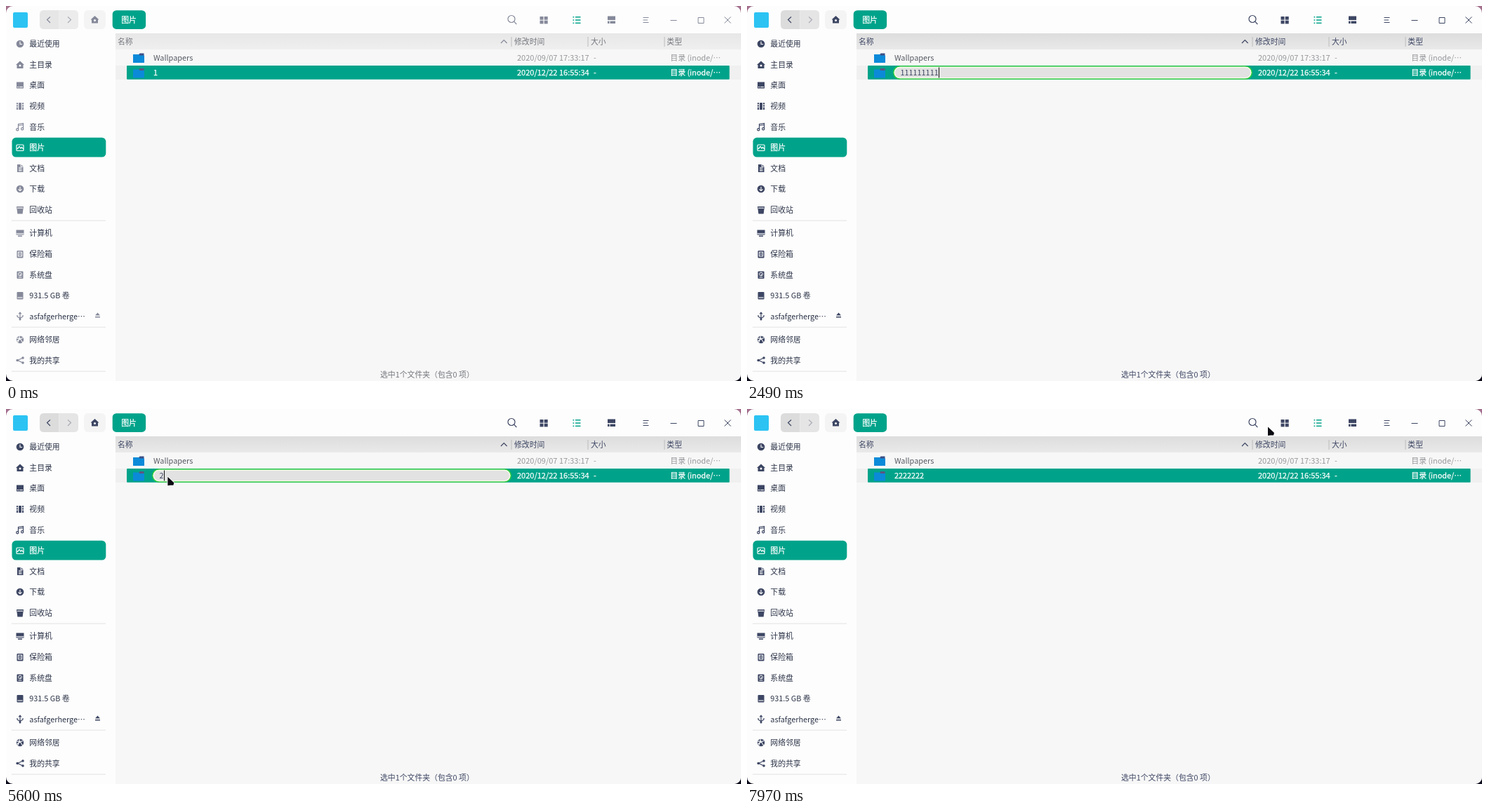
Write an HTML page that moves like this. It is 1047 px wide and 535 px high and loops after 8 s.

```html
<!DOCTYPE html>
<html lang="zh-CN">
<head>
<meta charset="utf-8">
<title>Rename a folder</title>
<style>
html, body { margin: 0; width: 100%; height: 100%; overflow: hidden; background: #16121f; }
svg {
  display: block; width: 1047px; height: 535px;
  --ink: #3d4663; --head: #3d4663; --bar1: #dddddd; --bar2: #e9e9e9; --back: #dcdcdc; --fwd: #e5e5e5;
}
svg.idle { --ink: #85899a; --head: #75777e; --bar1: #e7e7e7; --bar2: #efefef; --back: #e6e6e6; --fwd: #ececec; }
text { font: 10.85px "Noto Sans CJK SC", "Noto Sans CJK", "Noto Sans", sans-serif; white-space: pre; }
text.date { font-size: 11px; }
.bold { stroke: currentColor; stroke-width: .25px; }
.line { fill: none; stroke: var(--ink); stroke-width: 1.2; }
.ink { fill: var(--ink); }
.sheet { filter: drop-shadow(0 3px 7px rgba(0, 0, 0, .5)); }
</style>
</head>
<body>
<svg id="stage" viewBox="0 0 1047 535"></svg>
<script>
const TEAL = '#00a38a', LOOP = 8000;
const stage = document.getElementById('stage');

const rect = (x, y, w, h, fill, more = '') =>
  `<rect x="${x}" y="${y}" width="${w}" height="${h}" fill="${fill}" ${more}/>`;
// y is the middle of the line
const text = (x, y, s, fill, cls = '') =>
  `<text x="${x}" y="${y + 4}" fill="${fill}" color="${fill}" class="${cls}">${s}</text>`;
const strong = (x, y, s, fill, cls = '') => text(x, y, s, fill, 'bold ' + cls);
const at = (x, y, body) => `<g transform="translate(${x} ${y})">${body}</g>`;
const path = (d, cls = 'ink', more = '') => `<path class="${cls}" d="${d}" ${more}/>`;
const hole = (d) => `<path d="${d}" fill="none" stroke="#fdfdfd" stroke-width="1.1"/>`;

const drive = path('M-3.5-5h7q1 0 1 1V4.5q0 1-1 1h-7q-1 0-1-1V-4q0-1 1-1z');
const house = path('M0-5.5L6 0H4.5V5H-4.5V0H-6z') + '<circle cy="1" r="1.5" fill="#fdfdfd"/>';
const icons = {
  clock: '<circle r="5.3" class="ink"/>' + hole('M0-3.5V.5H3.2'),
  house,
  desk: path('M-5-4.5H5V4.5H-5z') + hole('M-4 2.5H-2M-1 2.5H4'),
  film: path('M-5-5H5V5H-5z') + hole('M-2.5-5V5M2.5-5V5M-5-2.2H-2.5M-5 1H-2.5M2.5-2.2H5M2.5 1H5'),
  note: path('M-2.5 3.5V-4L4.5-5V2.5M-2.5-2L4.5-3', 'line') +
    '<circle cx="-3.7" cy="3.7" r="1.6" class="line"/><circle cx="3.2" cy="2.7" r="1.6" class="line"/>',
  photo: '<path d="M-4-4H4q1 0 1 1V3.5q0 1-1 1H-4q-1 0-1-1V-3q0-1 1-1zM-4 2L-1-1.5 1 1 2.5-.5 4.5 2" fill="none" stroke="#fff" stroke-width="1.2"/>',
  doc: path('M-4-5.5H1.5L4.5-2.5V5.5H-4z') + hole('M-2-.8H2.5M-2 1.3H2.5M-2 3.4H2.5M1.2-5.5V-2.2H4.5'),
  down: '<circle r="5.3" class="ink"/>' + hole('M0-3.2V2.5M-2.5.3L0 2.8 2.5.3'),
  bin: path('M-5-5H5L3.6 5.5H-3.6z') + hole('M-4-2.8H4'),
  screen: path('M-5.5-4.5H5.5V2.5H-5.5zM-3 3.5H3V5H-3z') + hole('M-5.5 .8H5.5'),
  safe: drive + hole('M-2.5-3H2.5V3H-2.5zM0-1.5V1.5'),
  system: drive + '<circle cy="-1" r="2.4" fill="none" stroke="#fdfdfd"/>' + hole('M-2.5 3.5H2.5M0-1L1.5 1'),
  disk: drive + hole('M-3.5 3H3.5'),
  usb: path('M0 5V-5M-1.8-3.2L0-5.3 1.8-3.2M-4-1.5V.5L0 3.2 4 .5V-1.5', 'line') + '<circle cy="4.5" r="1.5" class="ink"/>',
  net: '<circle r="5.2" class="ink"/>' + hole('M-4.5-1.5Q0-4 3.5 4M-3 4Q-3-1 4-2.5M-1-5Q1-1-4.5 2'),
  share: path('M4-3.5L-3.5 0 4 3.5', 'line') + [[4, -3.5], [-3.8, 0], [4, 3.5]]
    .map(([x, y]) => `<circle cx="${x}" cy="${y}" r="1.8" class="ink"/>`).join('')
};

const places = [
  [54, 'clock', '最近使用'], [84, 'house', '主目录'], [113, 'desk', '桌面'], [143, 'film', '视频'],
  [172.5, 'note', '音乐'], [202, 'photo', '图片'], [231.5, 'doc', '文档'], [261, 'down', '下载'],
  [291, 'bin', '回收站'], [324, 'screen', '计算机'], [354, 'safe', '保险箱'], [383.5, 'system', '系统盘'],
  [413, 'disk', '931.5 GB 卷'], [442.5, 'usb', 'asfafgerherge…'], [476, 'net', '网络邻居'], [505.5, 'share', '我的共享']
];

function sidebar() {
  const seps = [306, 458, 521].map(y => rect(8, y - .5, 134, 1.5, '#ebebeb')).join('');
  const rows = places.map(([y, icon, name]) => {
    const on = icon === 'photo';
    return (on ? rect(8.5, 187.8, 133.8, 27.8, TEAL, 'rx="5.5"') : '') + at(20, y, icons[icon]) +
      (on ? strong : text)(33.3, y, name, on ? '#fff' : '#2c3448');
  }).join('');
  return seps + rows + path('M127 441.5L130.5 437.5 134 441.5zM127 443H134V444.5H127z');
}

function toolbar() {
  const tiles = [-5.5, .7].flatMap(x => [-5, .7].map(y => rect(x, y, 5, 4.7, 'var(--ink)'))).join('');
  const list = [-5, -.7, 3.6].map(y => rect(-5.5, y, 1.8, 1.5, TEAL) + rect(-2, y, 7.5, 1.5, TEAL)).join('');
  return rect(10, 9, 21, 22, '#2cc3f3', 'rx="2"') +
    path('M54 6H75.5V33H54q-6 0-6-6V12q0-6 6-6z', '', 'fill="var(--back)"') +
    path('M75.5 6H97q6 0 6 6V27q0 6-6 6H75.5z', '', 'fill="var(--fwd)"') +
    path('M63 15.5L58.5 19.5 63 24', 'line') +
    '<path d="M88 15.5L92.5 19.5 88 24" fill="none" stroke="#aaacb5" stroke-width="1.2"/>' +
    rect(111, 6, 31, 27, '#f4f4f4', 'rx="6"') + at(126.5, 19.5, house) +
    rect(151.7, 6.2, 47.4, 26.7, TEAL, 'rx="5.5"') + strong(164.2, 19.7, '图片', '#fff') +
    '<circle cx="720" cy="18.5" r="5" class="line"/>' + path('M723.6 22.2L727.3 26', 'line') +
    at(766, 20, tiles) + at(813, 20, list) +
    path('M857 14.5H868V20H857zM857 21.5H859.5V25H857zM860.5 21.5H868V25H860.5z') +
    path('M907.5 16.5H915.5M907.5 20H914M907.5 23.5H915.5M946.5 20.5H955.5M986 16.5H994V24.5H986zM1023.5 15.5L1032.5 24.5M1032.5 15.5L1023.5 24.5', 'line', 'style="stroke-width:1"');
}

function header() {
  const cols = [[159, '名称'], [724, '修改时间'], [833, '大小'], [941.3, '类型']];
  return rect(156, 39, 891, 23, 'url(#bar)') +
    [720, 829, 938].map(x => rect(x - .5, 44, 1, 14, '#bcbcbc')).join('') +
    cols.map(([x, s]) => text(x, 50.5, s, 'var(--head)')).join('') +
    path('M705 53L709.3 48.5 713.6 53', 'line');
}

const folder = (y, back) => at(181, y,
  path('M8 2L9.5 0H15.5V4H8z', '', `fill="${back}"`) +
  path('M0 1.5H8L9.5 3H16V13.5H0z', '', 'fill="#0b8ad9"'));
const details = (y, date, fill, put) =>
  put(728, y, date, fill, 'date') + put(837, y, '-', fill) + put(946.3, y, '目录 (inode/…', fill);

const items = [
  [116.5, '打开'], [140, '打开方式', 1], [163.2, '在新窗口打开'], [186.7, '在新标签中打开'], [210, '以管理员身份打开'],
  [235, '剪切'], [258.3, '复制'], [281.7, '重命名'], [305, '删除'], [330, '共享文件夹'], [355, '创建链接'],
  [378.3, '发送到桌面'], [401.5, '发送到', 1], [425, '添加书签'], [450, '在终端中打开'], [475, '标记信息'], [526, '压缩']
];
const tags = ['#c8955f', '#a16468', '#946a9e', '#4664a5', '#0a98dc', '#2ad02e', '#c8955f', '#c4c4c4'];

function menu(hover, clicked) {
  const rows = items.map(([y, s, sub], i) => {
    const on = i === hover, ink = on ? (clicked ? '#8fcfc4' : '#fff') : '#15161a';
    return (on ? rect(220, y - 11.7, 157, 23.4, TEAL) : '') + strong(245, y, s, ink) +
      (sub ? `<path d="M366 ${y - 4}l3.5 4-3.5 4" fill="none" stroke="${ink}"/>` : '');
  }).join('');
  return rect(220, 98.5, 157.3, 450, 'url(#sheet)', 'rx="7" class="sheet"') +
    (clicked ? rect(220, 100, 157, 70, 'url(#mist)', 'rx="6"') : rect(220, 99, 157, 29, '#e7f5f7', 'rx="6"')) +
    (clicked ? '' : '<path d="M222 101Q224 98.5 227 98.5H370Q373 98.5 375 101" fill="none" stroke="#36cf62"/>') +
    [222.5, 317.5, 342.5, 437.5, 462.5].map(y => rect(220, y - .7, 157, 1.4, '#d6d6d6')).join('') + rows +
    tags.map((c, i) => `<circle cx="${244.2 + i * 15.55}" cy="494.5" r="4.1" fill="${c}" stroke="#0003" stroke-width=".7"/>`).join('');
}

function editor({ value, selected, caret }) {
  const x = 218.5, end = n => x + n * 6.04;
  return rect(208.8, 86, 510.4, 18, '#e2e2e2', 'rx="9" stroke="#2fcb3c" stroke-width="1.6"') +
    rect(210.2, 87.4, 507.6, 15.2, 'none', 'rx="7.6" stroke="#f4fce8" stroke-width="1.4"') +
    (selected ? rect(x - .5, 87.5, end(value.length) - x + .5, 15, TEAL) : '') +
    text(x, 95.3, value, selected ? '#fff' : '#3d4663') +
    (caret >= 0 ? rect(Math.round(end(caret)), 87.5, 1, 15, '#111') : '');
}

stage.innerHTML = `<defs>
  <linearGradient id="wall" x2="0" y2="1"><stop offset="0" stop-color="#a5708f"/><stop offset=".5" stop-color="#4a3658"/><stop offset="1" stop-color="#0c0c1c"/></linearGradient>
  <linearGradient id="bar" x2="0" y2="1"><stop offset="0" style="stop-color:var(--bar1)"/><stop offset="1" style="stop-color:var(--bar2)"/></linearGradient>
  <linearGradient id="sheet" gradientUnits="userSpaceOnUse" x1="0" x2="0" y1="98" y2="535"><stop offset="0" stop-color="#fafafa"/><stop offset=".91" stop-color="#f9f9f9"/><stop offset="1" stop-color="#dedee2"/></linearGradient>
  <linearGradient id="mist" x2="0" y2="1"><stop offset="0" stop-color="#f7fafa"/><stop offset=".4" stop-color="#eff8f7"/><stop offset="1" stop-color="#fafafa"/></linearGradient>
  <clipPath id="win"><rect width="1047" height="535" rx="10"/></clipPath></defs>
  ${rect(0, 0, 1047, 535, 'url(#wall)')}
  <g clip-path="url(#win)">${rect(0, 0, 1047, 535, '#fdfdfd')}${rect(156, 39, 891, 496, '#f7f7f7')}
  ${toolbar()}${sidebar()}${header()}
  ${folder(67.5, '#3d4f86')}${text(210, 73.7, 'Wallpapers', '#555962')}${details(73.7, '2020/09/07 17:33:17', '#96979b', text)}
  ${rect(156, 85, 891, 20, '#f0f0f0')}<g id="row"></g><g id="status">${text(533, 526, '选中1个文件夹（包含0 项）', 'var(--head)')}</g>
  <g id="menu"></g></g><g id="pointer"></g>`;
const part = Object.fromEntries(['row', 'status', 'menu', 'pointer'].map(id => [id, document.getElementById(id)]));

// latest value whose time has come
const step = (t, list) => list.reduce((v, [when, value]) => t >= when ? value : v, null);
const count = (t, from, gap, max) => t < from ? 0 : Math.min(max, 1 + Math.floor((t - from) / gap + 1e-6));

function editState(t) {
  if (t < 1870) return { value: '1', selected: true, caret: -1 };
  if (t < 2830) {
    const n = 1 + count(t, 2140, 50, 8);
    return { value: '1'.repeat(n), caret: n };
  }
  if (t < 5470) {
    const selected = t < 4100 || t >= 5190;
    return { value: '1'.repeat(9), selected, caret: t >= 4990 && !selected ? 1 : -1 };
  }
  const n = t < 6380 ? count(t, 5470, 227, 4) : 4 + count(t, 6380, 120, 3);
  return { value: '2'.repeat(n), caret: n };
}

const track = [
  [5470, 224, 92], [5800, 240, 104], [6240, 264, 118.5], [6420, 264, 118.5], [6680, 276, 126], [6900, 276, 126],
  [7200, 420, 108], [7500, 620, 68], [7650, 709, 52], [7690, 724, 42], [7790, 767, 13], [7970, 742, 25.5], [8000, 742, 25.5]
];
const beam = ['stroke="#fff" stroke-width="2"', 'stroke="#222" stroke-width=".9"']
  .map(s => `<path d="M-2.5-6.5Q0-6.5 0-5Q0-6.5 2.5-6.5M0-5V5M-2.5 6.5Q0 6.5 0 5Q0 6.5 2.5 6.5" fill="none" ${s}/>`).join('');
const arrow = '<path d="M0 0V12.5L4 12H8L9 8.5Z" fill="#0b0b12" stroke="#fff" stroke-width="1.6" stroke-linejoin="round" paint-order="stroke"/>';

function pointer(t) {
  if (t < 3990) return '';
  if (t < 5520) return at(t < 4400 ? 223 : 224, 92, beam);
  const i = track.findIndex(p => p[0] > t);
  const [a, b] = [track[i - 1], track[i]], k = (t - a[0]) / (b[0] - a[0]);
  return at(a[1] + (b[1] - a[1]) * k, a[2] + (b[2] - a[2]) * k, arrow);
}

function row(t) {
  const editing = (t >= 1360 && t < 2830) || (t >= 3830 && t < 6880);
  const off = (t >= 2900 && t < 2970) || (t >= 6940 && t < 7000);
  const name = step(t, [[0, '1'], [2900, '1'.repeat(9)], [6940, '2'.repeat(7)]]);
  const put = off ? text : strong;
  return (off ? '' : rect(172, 85, 858.6, 19.8, TEAL, 'rx="1"')) + folder(89, '#5c5580') +
    details(95.3, '2020/12/22 16:55:34', off ? '#96979b' : '#fff', put) +
    (editing ? editor(editState(t)) : put(210, 95.3, name, off ? '#555962' : '#fff'));
}

const fade = [[0, 0], [430, .25], [480, .5], [530, .75], [580, 1], [1450, .85], [1500, .65], [1560, .4], [1610, .2], [1670, 0]];
const hovers = [[0, -1], [760, 1], [810, 3], [870, 5], [930, 6], [1000, 7]];
const last = {};

function show(id, html) {
  if (last[id] !== html) part[id].innerHTML = last[id] = html;
}

function draw(t) {
  stage.classList.toggle('idle', t < 380);
  show('row', row(t));
  part.status.setAttribute('opacity', t >= 2900 && t < 2970 ? 0 : 1);
  const alpha = step(t, fade);
  part.menu.setAttribute('opacity', alpha);
  show('menu', alpha ? menu(step(t, hovers), t >= 1310) : '');
  show('pointer', pointer(t));
}

const start = performance.now();
function tick() {
  draw(Math.max(0, performance.now() - start) % LOOP);
  requestAnimationFrame(tick);
}
tick();
</script>
</body>
</html>
```
